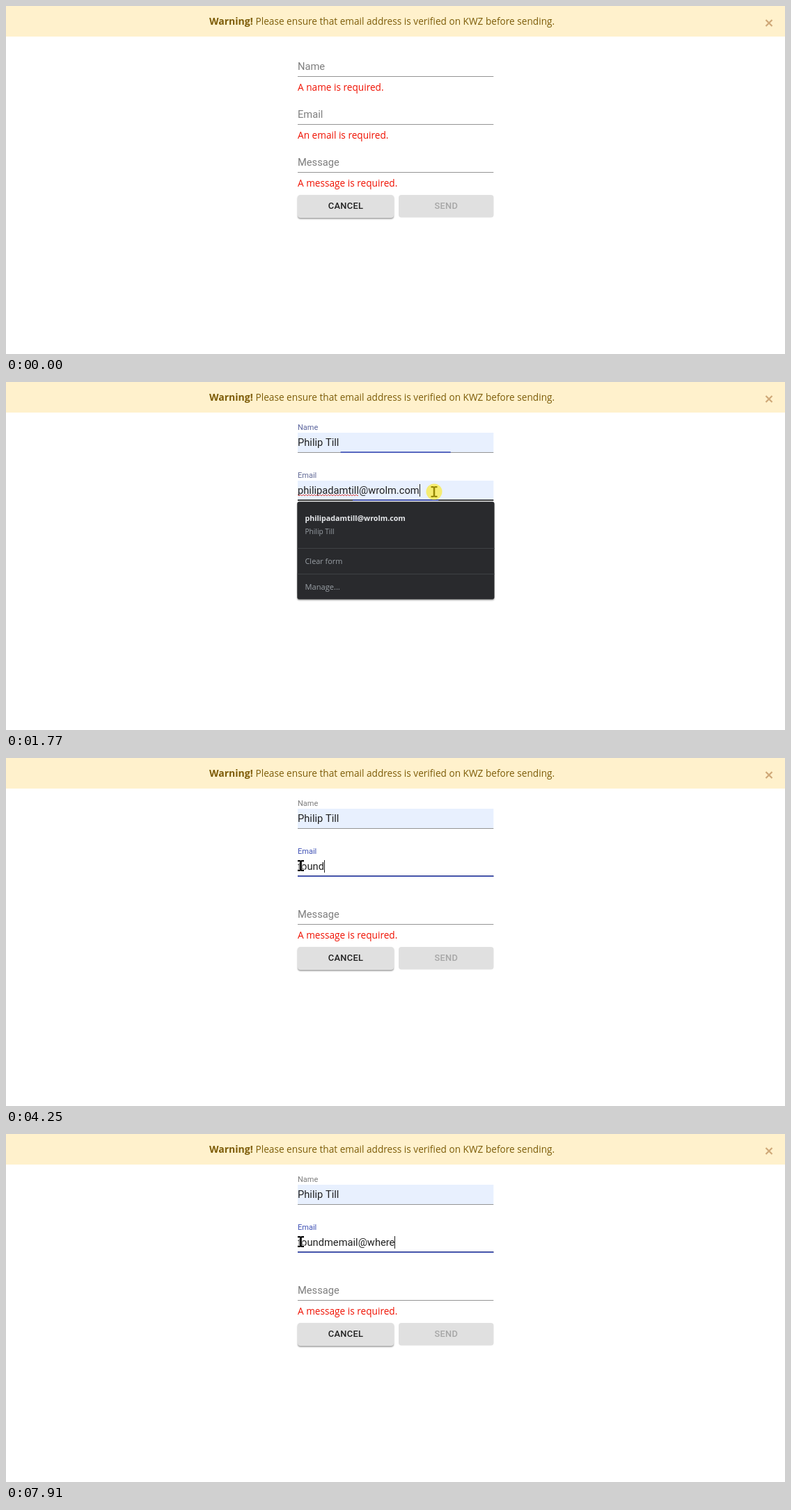
Animation, 1119 px wide and 501 px high, one loop 8 s. Source, as an HTML page with a canvas:

```html
<!DOCTYPE html>
<html lang="en">
<head>
<meta charset="utf-8">
<title>Contact form</title>
<style>
html, body { margin: 0; width: 100%; height: 100%; overflow: hidden; background: #fff; }
canvas { display: block; }
</style>
</head>
<body>
<canvas id="stage" width="1119" height="501"></canvas>
<script>
const LOOP = 8000;
const LEFT = 419, WIDTH = 281.3, ROW = 69;
const BLUE = [63, 81, 181], GREY = [126, 126, 126];
const UI = '"Open Sans", "Noto Sans", sans-serif';
const FORM = 'Roboto, sans-serif';
const INPUT = '14.7px ' + FORM;

const NAME = 'Philip Till';
const EMAIL = 'philipadamtill@wrolm.com';
const TYPED = 'foundmemail@where';
const KEYS = [2840, 3300, 3700, 3850, 4250, 4310, 5020, 5240, 5410, 5560, 5730,
  6740, 7130, 7510, 7590, 7740, 7910];

const FOCUS_NAME = 560, PREVIEW = 950, PICK = 1130, FOCUS_EMAIL = 1684, DRAG = 1980, RELEASE = 2370;
// Pointer path: time, x, y
const PATH = [[70, 982, 475], [540, 531, 83.5], [840, 531, 83.5], [1130, 503, 124], [1240, 503, 124],
  [1600, 615, 158], [DRAG, 615, 158], [2210, 419, 163], [2370, 419, 163], [2590, 423.5, 155]];
const PRESSES = [[530, 640], [1050, PICK], [1660, RELEASE]];

const c = document.getElementById('stage').getContext('2d');
const clamp = v => Math.max(0, Math.min(1, v));
const easeOut = (t, start) => 1 - (1 - clamp((t - start) / 260)) ** 2;
const mix = (a, b, p) => `rgb(${a.map((v, i) => Math.round(v + (b[i] - v) * p))})`;

function rect(x, y, w, h, color) {
  c.fillStyle = color;
  c.fillRect(x, y, w, h);
}

function text(str, x, y, font, color, align = 'left') {
  c.font = font;
  c.fillStyle = color;
  c.textAlign = align;
  c.fillText(str, x, y);
}

function box(x, y, w, h, r, color, shadow) {
  c.save();
  if (shadow) {
    c.shadowColor = 'rgba(0,0,0,.4)';
    c.shadowBlur = 2;
    c.shadowOffsetY = 1.5;
  }
  c.fillStyle = color;
  c.beginPath();
  c.roundRect(x, y, w, h, r);
  c.fill();
  c.restore();
}

function textWidth(str) {
  c.font = INPUT;
  return c.measureText(str).width;
}

function pointerAt(t) {
  let i = 0;
  while (i < PATH.length - 2 && t > PATH[i + 1][0]) i++;
  const [t0, x0, y0] = PATH[i], [t1, x1, y1] = PATH[i + 1];
  const u = clamp((t - t0) / (t1 - t0)), p = u * u * (3 - 2 * u);
  return { x: x0 + (x1 - x0) * p, y: y0 + (y1 - y0) * p };
}

function banner() {
  rect(0, 0, 1119, 44, '#fff1cc');
  text('Warning!', 292, 27, 'bold 14px ' + UI, '#7d5c08');
  text('Please ensure that email address is verified on KWZ before sending.',
    358.5, 27, '13.65px ' + UI, '#7d5c08');
  c.strokeStyle = '#cfa878';
  c.lineWidth = 2.2;
  c.beginPath();
  c.moveTo(1091.5, 20);
  c.lineTo(1100.5, 29);
  c.moveTo(1100.5, 20);
  c.lineTo(1091.5, 29);
  c.stroke();
}

function field(f, row) {
  const y = row * ROW, { value = '', float = 0, focus = 0 } = f;
  if (f.filled) rect(LEFT, y + 73, WIDTH, 28, '#e8f0fe');
  text(f.label, LEFT, y + 92 - 23 * float, `${14.7 - 3.7 * float}px ${FORM}`, mix(GREY, BLUE, focus));
  text(value, LEFT, y + 92, INPUT, '#212121');
  if (f.hover) rect(LEFT, y + 100.3, WIDTH, 1.7, '#212121');
  else rect(LEFT, y + 101, WIDTH, 1, '#949494');
  if (focus > 0) rect(LEFT + WIDTH * (1 - focus) / 2, y + 100.3, WIDTH * focus, 1.7, `rgb(${BLUE})`);
  if (f.error) text(f.error, LEFT, y + 122, '13.65px ' + UI, '#f01000');
  if (f.caret) rect(Math.round(LEFT + textWidth(value)), y + 78, 1, 18, '#222');
}

function buttons() {
  const font = '500 12.85px ' + FORM;
  box(419, 272, 138, 33, 4, '#e0e0e0', true);
  box(564, 272, 136.5, 32.5, 4, '#e0e0e0');
  c.letterSpacing = '0.3px';
  text('CANCEL', 488, 292.3, font, '#212121', 'center');
  text('SEND', 632.3, 292.3, font, '#a6a6a6', 'center');
  c.letterSpacing = '0px';
}

const popup = (y, h) => box(418.3, y, 283.2, h, 3, '#292a2d', true);
const title = (s, y) => text(s, 429.5, y, 'bold 10.7px ' + UI, '#e8eaed');
const detail = (s, y, size = 10.1) => text(s, 429.5, y, `${size}px ${UI}`, '#9aa0a6');
const divider = y => rect(418.3, y, 283.2, 1, '#3f4245');

function namePopup(hover) {
  popup(103.3, 221.5);
  if (hover) rect(418.3, 111, 283.2, 52, '#3f4043');
  title(NAME, 131);
  detail(EMAIL, 150);
  title(NAME, 183.5);
  detail('philipatill@qyv.com', 202.5);
  title('Philip', 236);
  title('Frankie Dalton', 268.5);
  divider(288);
  detail('Manage...', 311, 11.1);
}

function emailPopup() {
  popup(172.3, 140.5);
  title(EMAIL, 200);
  detail(NAME, 219);
  divider(239);
  detail('Clear form', 262, 10.9);
  divider(276);
  detail('Manage...', 299, 11.1);
}

function squiggle() {
  const end = LEFT + textWidth(EMAIL.split('@')[0]);
  c.strokeStyle = '#e04848';
  c.lineWidth = 1;
  c.beginPath();
  for (let x = LEFT; x < end; x++) c.lineTo(x, 163 + Math.sin(x * Math.PI / 2));
  c.stroke();
}

// Highlights the end of the address back to the pointer
function selection(x) {
  const from = Math.max(LEFT, x), end = LEFT + textWidth(EMAIL);
  if (from >= end) return;
  c.save();
  c.beginPath();
  c.rect(from, 147, end - from, 18);
  c.clip();
  rect(from, 147, end - from, 18, '#3390ff');
  text(EMAIL, LEFT, 161, INPUT, '#fff');
  c.restore();
}

function pointer({ x, y }, beam, pressed) {
  c.save();
  c.translate(x, y);
  c.fillStyle = '#000';
  c.strokeStyle = '#fff';
  c.lineWidth = 1.5;
  c.lineJoin = 'round';
  const shape = new Path2D(beam
    ? 'M-4.5-8h3.5l1 .8 1-.8h3.5v2.2h-3.2V5.8h3.2V8H1L0 7.2-1 8h-3.5V5.8h3.2V-5.8h-3.2z'
    : 'M0 0v15l3.4-3.2 2.8 6 2.8-1.3-2.8-5.6h4.6z');
  c.stroke(shape);
  c.fill(shape);
  if (pressed) {
    c.fillStyle = 'rgba(255,233,10,.58)';
    c.beginPath();
    c.arc(0, 0, 11.5, 0, 7);
    c.fill();
  }
  c.restore();
}

function draw(time) {
  // The screen refreshes in even steps while the pointer moves
  const t = time > 70 && time < 2700 ? Math.max(70, 52 + 77.14 * Math.floor((time - 52) / 77.14)) : time;
  const pos = pointerAt(t);
  const over = row => pos.x >= LEFT && pos.x <= 700 && pos.y > 73 + row * ROW && pos.y < 102 + row * ROW;
  const filled = t >= PREVIEW, typing = t >= KEYS[0], inEmail = t >= FOCUS_EMAIL;
  const count = KEYS.filter(k => k <= t).length;
  const nameFocus = easeOut(t, FOCUS_NAME), emailFocus = easeOut(t, FOCUS_EMAIL);

  rect(0, 0, 1119, 501, '#fff');
  banner();
  field({
    label: 'Name', value: filled ? NAME : '', filled, hover: over(0),
    float: nameFocus, focus: nameFocus - emailFocus,
    error: !filled && 'A name is required.',
    caret: t >= FOCUS_NAME && !inEmail && (t < PREVIEW || (t >= PICK && t < PICK + 540))
  }, 0);
  field({
    label: 'Email', value: typing ? TYPED.slice(0, count) : filled ? EMAIL : '',
    filled: filled && !typing, hover: over(1),
    float: easeOut(t, PREVIEW), focus: emailFocus,
    error: !filled && 'An email is required.',
    caret: typing ? t - KEYS[count - 1] < 540 : inEmail && t < DRAG
  }, 1);
  field({ label: 'Message', error: 'A message is required.' }, 2);
  buttons();

  if (t >= FOCUS_NAME + 50 && t < PICK) namePopup(pos.y > 111);
  if (inEmail && !typing) {
    squiggle();
    if (t >= DRAG) selection(pos.x);
    emailPopup();
  }
  if (t >= 70) pointer(pos, over(0) || over(1), PRESSES.some(([a, b]) => t >= a && t < b));
}

function tick() {
  draw(performance.now() % LOOP);
  requestAnimationFrame(tick);
}
tick();
</script>
</body>
</html>
```
